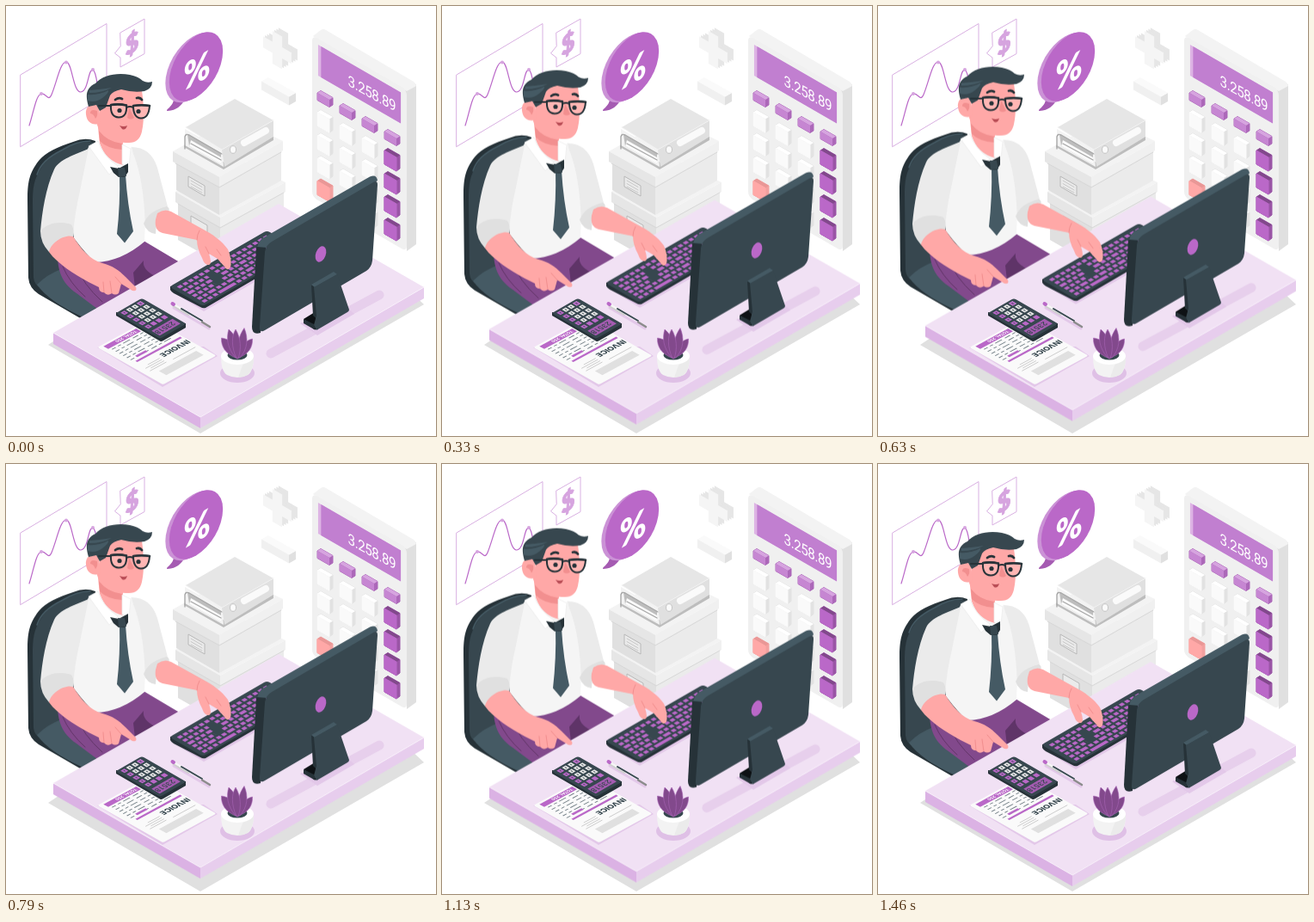
These frames come from a looping animation (500x500 px, 1.5 s). An HTML page:

```html
<!DOCTYPE html>
<html lang="en">
<head>
<meta charset="utf-8">
<title>Accountant at a desk</title>
<style>
html, body { margin: 0; width: 100%; height: 100%; overflow: hidden; background: #fff; }
svg { display: block; width: 100vw; height: 100vh; }
.float { animation: float 1.5s linear -20ms infinite; }
@keyframes float {
  0%, 100% { transform: translateY(.27px); }
  50% { transform: translateY(-9.73px); }
}
.ink { fill: #263238; } .dark { fill: #37474f; } .steel { fill: #455a64; }
.violet { fill: #ba68c8; } .orchid { fill: #c17fd0; } .plum { fill: #82498c; }
.skin { fill: #ffa8a7; } .blush { fill: #f28f8f; }
.g1 { fill: #fafafa; } .g2 { fill: #f3f3f3; } .g3 { fill: #ebebeb; } .g4 { fill: #e0e0e0; }
.line { fill: none; stroke-linecap: round; stroke-linejoin: round; }
.pale { stroke: #d9b0e2; } .vio { stroke: #ba68c8; } .gray { stroke: #c7c7c7; } .char { stroke: #263238; }
.white { fill: #fff; }
</style>
</head>
<body>
<svg viewBox="0 0 500 500" xmlns="http://www.w3.org/2000/svg">
<defs>
  <path id="plus" d="M-6.5-19h13v12.500h12.500v13H6.500V19h-13V6.500H-19v-13h12.500z"/>
  <g id="key">
    <path d="M0 3 4 .5 18 8.500V24L14 27 0 19z" fill="var(--side)" stroke="var(--side)" stroke-linejoin="round"/>
    <path d="M0 3 4 .5 18 8.500 14 11z" fill="var(--top)"/>
    <path d="M0 3 14 11V27L0 19z" fill="var(--face)" stroke="var(--face)" stroke-linejoin="round"/>
  </g>
  <g id="flat" stroke-linejoin="round">
    <path d="M0 3 4 .5 18 8.500V17L14 19.500 0 11.500z" fill="#ac68b9" stroke="#ac68b9"/>
    <path d="M0 3 4 .5 18 8.500 14 11z" fill="#d6a4df"/>
    <path d="M0 3 14 11V19.500L0 11.500z" fill="#c686d2"/>
  </g>
</defs>

<!-- chart and bubbles -->
<g class="line">
  <path class="pale" d="M17 80 117 20.500V104L17 163.500z"/>
  <path class="vio" stroke-width="1.200" d="M27 139C32 124 35 103 41 102S49 112 53 103C59 89 63 65 70 65S78 101 87 100 95 74 101 74Q104 76 106 90"/>
  <path class="pale" d="M133 31 161 15V55.500L133 71V60L126.500 55 133 47z"/>
</g>
<g fill="#d6a4df">
  <circle cx="41" cy="102" r="2"/><circle cx="70" cy="65.500" r="2"/><circle cx="101" cy="74" r="2"/>
  <text transform="matrix(.866 -.5 0 1 146.500 54.500)" text-anchor="middle" font-family="Lato, sans-serif" font-weight="900" font-size="31" stroke="#d6a4df">$</text>
</g>
<path d="M191 96Q200 108 190 118 185 122 188 122 203 121 209 106z" fill="#a55bb2"/>
<g fill="#cb92d6">
  <circle r="36" transform="matrix(.866 -.5 0 1 216.500 72)"/>
  <circle r="36" transform="matrix(.866 -.5 0 1 218.500 71.200)"/>
</g>
<circle r="36" class="violet" transform="matrix(.866 -.5 0 1 221 70.500)"/>
<text transform="matrix(.866 -.5 0 1 222 90)" text-anchor="middle" font-family="Lato, sans-serif" font-weight="900" font-size="43" class="white">%</text>

<!-- plus and minus -->
<g fill="#e6e6e6">
  <use href="#plus" transform="matrix(.866 .5 0 1 322.500 47.500)"/>
  <use href="#plus" transform="matrix(.866 .5 0 1 320 48.800)"/>
  <use href="#plus" transform="matrix(.866 .5 0 1 317.500 50.100)"/>
</g>
<use href="#plus" fill="#f5f5f5" transform="matrix(.866 .5 0 1 315.500 51.300)"/>
<path class="g4" d="M329 105.500 337 101V111L329 115.500z"/>
<path class="g1" d="M297 87.500 305 83 337 101 329 105.500z"/>
<path fill="#f0f0f0" d="M297 87.500 329 105.500V115.500L297 97.500z"/>

<!-- wall calculator -->
<path class="g4" d="M464 97 477 91V277L466 285z"/>
<path class="g2" d="M357 35 366 28Q369 26 372 28L474 88Q477 90 477 93L466 99z"/>
<g transform="matrix(.866 .5 0 1 356 34)">
  <rect width="127" height="188" rx="6" fill="#f0f0f0"/>
  <rect x="8" y="7" width="111" height="36" fill="#ddb4e4"/>
  <rect x="12" y="7" width="107" height="36" class="orchid"/>
  <text x="48" y="35" transform="skewY(-1)" font-family="Roboto, sans-serif" font-size="17.500" letter-spacing="-.5" class="white">3.258.89</text>
</g>
<use href="#flat" x="362" y="98"/><use href="#flat" x="388" y="113"/><use href="#flat" x="414" y="128"/><use href="#flat" x="440" y="143"/>
<g style="--face:#fafafa;--top:#fff;--side:#e2e2e2">
  <g id="col"><use href="#key" x="362" y="120.500"/><use href="#key" x="362" y="147.500"/><use href="#key" x="362" y="174"/></g>
  <use href="#col" x="26" y="15"/><use href="#col" x="52" y="30"/>
  <use href="#key" x="388" y="216"/><use href="#key" x="414" y="231"/>
</g>
<g style="--face:#ffa8a7;--top:#e99796;--side:#f2a09f"><use href="#key" x="362" y="200.500"/></g>
<g style="--face:#ba68c8;--top:#82498c;--side:#9a55a6">
  <use href="#key" x="440" y="165"/><use href="#key" x="440" y="192"/><use href="#key" x="440" y="219"/><use href="#key" x="440" y="246"/>
</g>

<!-- boxes and binder -->
<path class="g4" d="M200 225 249 253V300L200 272z"/>
<path class="g3" d="M249 253 323 212V262L249 300z"/>
<path class="g2" d="M197 216 268 178 325 205 249 246z"/>
<path fill="#e6e6e6" d="M197 216 249 246V257L197 228z"/>
<path fill="#f0f0f0" d="M249 246 325 205V216L249 257z"/>
<path class="line" stroke="#d8d8d8" d="M200 230 249 258 323 217"/>
<path class="g3" stroke="#b8b8b8" d="M215 244 234 255V266L215 256z"/>
<path class="g4" d="M198 180 248 208V243L198 214z"/>
<path class="g3" d="M248 208 320 168V203L248 243z"/>
<path class="g2" d="M194 169 265 130 322 157 248 199z"/>
<path fill="#e6e6e6" d="M194 169 248 199V210L194 181z"/>
<path fill="#f0f0f0" d="M248 199 322 157V168L248 210z"/>
<path class="line" stroke="#d8d8d8" d="M197 183 248 211 320 170"/>
<path class="g3" stroke="#b8b8b8" d="M212 198 231 209V221L212 210z"/>
<path class="line gray" d="M215 203 228 210.500M215 206.500 228 214M215 210 228 217"/>
<path fill="#bdbdbd" d="M207 164 253 190 311 156V151L254 182 209 157z"/>
<path class="g2" d="M208 143 251 167 253 187 208 162z"/>
<path fill="#bdbdbd" d="M211 149 250 171V184L213 163z"/>
<path class="g1" d="M215 156 250 176V184L213 163z"/>
<path class="line" stroke="#a8a8a8" stroke-width="1.400" d="M208 166V152Q209 148 213 150L251 172M215 160 250 179"/>
<path fill="#e6e6e6" d="M209 141 266 108 311 133 251 167z"/>
<path class="g4" d="M251 167 311 133V152L254 187z"/>
<path class="line" stroke="#fafafa" stroke-width="8" d="M277 159 302 145"/>
<path class="line" stroke="#f2f2f2" d="M209 141 251 167 311 133"/>
<ellipse cx="264" cy="167" rx="3.500" ry="4.300" fill="#fafafa" stroke="#c5c5c5"/>

<path class="g4" d="M49 394 226 497 486 347 470 332 226 465 70 380z"/>

<g class="float">
  <!-- chair -->
  <path class="ink" d="M104 157Q92 152 78 158C60 164 46 170 38 180 27 194 25 205 25 226L26 316Q27 328 38 335L88 364 115 345z"/>
  <path class="dark" d="M106 160Q90 155 74 163C58 170 46 178 41 188 32 202 31 212 31 230L32 316Q33 324 40 328L70 345 120 300z"/>
  <path class="line" stroke="#455a64" stroke-width="1.500" d="M98 157Q82 157 66 167C48 176 40 184 36 196"/>
  <path class="steel" d="M36 324Q48 312 64 306L120 340 90 362Q50 344 36 324z"/>

  <!-- trousers -->
  <path class="plum" d="M60 289C60 306 64 322 82 334L106 352 202 298 160 273 108 292z"/>
  <path fill="#5f3468" d="M148 310 160 296Q158 306 173 314L150 327z"/>
  <path class="line" stroke="#633669" d="M84 305Q88 322 112 344M66 303Q74 322 92 338"/>

  <!-- shirt -->
  <path class="skin" d="M106 132 109 160Q118 184 136 185L136 150z"/>
  <path class="blush" d="M108 145Q118 158 135 160L135 167Q118 166 109 157z"/>
  <path fill="#f5f5f5" d="M96 164C88 180 78 215 76 250L79 270Q94 290 104 298 134 297 161 274L162 250C168 226 160 184 146 163L136 185Q116 180 109 160z"/>
  <path class="g3" d="M96 166C80 173 62 178 56 190 46 212 42 240 40 262L78 266Q80 240 86 215 92 185 96 166z"/>
  <path class="g4" d="M40 262C48 252 62 250 76 254Q80 261 78 269C66 268 56 277 50 286Q40 275 40 262z"/>
  <path class="g3" d="M146 164C161 164 171 172 176 188L189 237 162 256Q160 200 148 172z"/>
  <path class="g4" d="M187 233Q192 236 188 240 175 240 174 265 164 264 160 253 166 238 187 233z"/>
  <path class="white" stroke="#ebebeb" stroke-width=".7" d="M96 163 107 157Q112 174 130 186L120 196z"/>
  <path class="white" stroke="#ebebeb" stroke-width=".7" d="M135 161 145 166 143 187 135 184z"/>
  <path class="steel" d="M132 196H139Q141 230 148 262L138 275.500 129 265Q133 230 132 196z"/>
  <path class="ink" d="M121 187 131 189 142 183V193L138 199 131 199 125 194z"/>
  <path class="dark" d="M130 188H138L140 198 131 199z"/>

  <!-- head -->
  <path class="skin" d="M112 104 124 90 156 88C161 110 161 134 158 146Q155 159 143 159C124 159 111 153 106 138z"/>
  <path class="skin" d="M108 117C99 111 92 117 93 126 94 136 102 140 110 136z"/>
  <path class="blush" d="M106 122Q98 119 98 125 102 125 104 131 107 128 106 122z"/>
  <path class="dark" d="M96 117C92 104 93 95 104 90 112 80 130 77 144 80Q154 82 159 87 164 90 170 88 170 96 161 99 148 101 134 97 124 99 121 104L116 118 109 122 105 115z"/>
  <path class="steel" d="M95 110Q104 113 112 107 120 101 119 98 108 104 95 103zM97 101Q112 101 123 95 110 97 97 98z"/>
  <path class="line char" stroke-width="2.800" d="M127 109Q131 106 135 108M152 107Q156 106 158 109"/>
  <path class="blush" d="M143 118Q142 125 141 130 145 133 149 130z"/>
  <g class="line char" stroke-width="2">
    <path fill="#ffb6b4" d="M122 115Q131 113.500 140 115.500 141 129.500 131 129.500 121 129 122 115z"/>
    <path fill="#ffb6b4" d="M148 116Q158 114.500 167 116 166 130.500 157 130.500 148 130 148 116z"/>
    <path d="M108 116 122 116M140 118Q144 116 148 118"/>
    <path stroke-width="2.600" d="M122 115Q131 113.500 140 115.500M148 116Q158 114.500 167 116"/>
  </g>
  <g class="ink"><circle cx="132" cy="121.500" r="2.600"/><circle cx="154" cy="122.500" r="2.600"/></g>
  <path fill="#b94c55" d="M132 139Q137 141 141 139 139 145 135 143z"/>

  <!-- desk -->
  <path fill="#dbb2e4" d="M55 380 226 477V491L55 393z"/>
  <path fill="#e7cded" d="M226 477 486 327V340L226 491z"/>
  <path fill="#f1e1f4" d="M55 380 317 230 486 327 226 478z"/>
  <path class="line" stroke="#f8effa" d="M55 380 226 478 486 327"/>
  <path class="line" stroke="#e7cfec" stroke-width="11" d="M308 404 434 336"/>
  <path fill="#e3c8e9" d="M342 369 362 383 405 358 396 350z"/>

  <!-- keyboard -->
  <path fill="#e3c8e9" d="M196 334 230 355 310 309 310 290z"/>
  <path class="ink" d="M191 326V330Q192 332 195 334L226 350Q229 352 232 351L345 285V279z"/>
  <g transform="matrix(.866 -.5 .866 .5 190 326.500)">
    <rect width="131" height="45" rx="4" class="dark"/>
    <g fill="none" class="vio" stroke-width="4">
      <path stroke-dasharray="4.800 2.400" d="M5 7H126"/>
      <path stroke-dasharray="4.800 2.400" d="M5 14H38M48 14H126"/>
      <path stroke-dasharray="7.600 2.400 4.800 2.400 4.800 2.400" d="M5 20.500H36M50 20.500H126"/>
      <path stroke-dasharray="4.800 2.400" d="M5 27H34M45 27H126"/>
      <path stroke-dasharray="4.800 2.400 4.800 2.400 8.600 2.400" d="M5 33.500H126"/>
      <path stroke-dasharray="4.800 2.400 4.800 2.400 4.800 2.400 22 2.400" d="M5 40H126"/>
    </g>
  </g>

  <!-- arms -->
  <path class="skin" d="M176 241Q184 235 192 239L228 259C240 265 252 274 258 283Q263 294 261 304 257 309 254 303L246 294 236 288Q240 300 236 301 231 302 228 293 222 282 222 272L182 264Q172 261 174 248z"/>
  <path class="line" stroke="#f28f8f" d="M236 288 232 280M250 290 245 283M225 261Q222 266 222 272"/>
  <path class="skin" d="M50 286C52 275 68 265 78 268 88 284 98 295 112 299 124 302 131 307 139 315L151 327Q153 332 147 331L134 323 131 334Q127 337 123 334 118 338 114 333 108 333 108 327L96 321C80 312 60 300 50 286z"/>
  <path class="line" stroke="#f28f8f" d="M134 323 127 315M123 334 121 320M114 333 113 321"/>

  <!-- monitor -->
  <path class="ink" d="M303 269 296 380Q286 383 286 373L291 282Q292 274 303 269z"/>
  <path class="steel" d="M292 280Q294 272 301 268.500L423 198.500Q431 195 432 203L304 281z"/>
  <path class="dark" d="M309 274 427 205Q432 202 432 208L426 296Q425 304 419 308L301 377Q294 381 295 372L301 286Q302 278 309 274z"/>
  <ellipse cx="366" cy="288.500" rx="5.800" ry="9.500" transform="rotate(20 366 288.500)" class="violet"/>
  <path fill="#0e1215" d="M346 364 359 356 363 376 358 376z"/>
  <path class="ink" d="M346 364 358 370 360 377 346 369zM355 324 359 327 363 365 357 360z"/>
  <path class="steel" d="M355 324 381 309 385 312 359 327z"/>
  <path class="dark" d="M358 327 385 312 399 353Q399 355 397 356L361 377 358 371 361 360z"/>
</g>

<!-- invoice -->
<path fill="#e3c8e9" d="M106 397 182 443 246 407 230 396z"/>
<g transform="matrix(-.866 .47 -.866 -.49 244.500 406.500)">
  <rect width="71.500" height="88" rx="2" class="g1"/>
  <rect x="8" y="9" width="50" height="10" class="g4"/>
  <text x="1" y="39" font-family="Inter, sans-serif" font-weight="800" font-size="8.800" class="dark">INVOICE</text>
  <rect x="2" y="44" width="60" height="2.600" class="violet"/>
  <g fill="none" class="gray" stroke-width=".8">
    <path d="M42 25H64M42 28H60M42 31H64M42 34H58M4 24H34"/>
  </g>
  <g fill="none" stroke="#77838a" stroke-width="1.100" stroke-dasharray="9 3 4 3 7 4">
    <path d="M10 51H64M10 56H64M10 61H64M10 66H64M10 71H64M10 76H64"/>
  </g>
  <rect x="42" y="50" width="14" height="3" class="violet"/>
  <rect x="22" y="79" width="44" height="6.500" class="violet"/>
  <text x="25" y="84.300" font-family="Inter, sans-serif" font-weight="700" font-size="5" class="white">TOTAL 250</text>
</g>

<!-- pocket calculator -->
<path class="ink" d="M128 356V360L178 389Q180 391 183 389L209 374V369z"/>
<g transform="matrix(-.866 .5 -.866 -.5 209.500 369.500)">
  <rect width="35" height="59.500" rx="3" class="dark"/>
  <rect x="3.500" y="4" width="28" height="11" fill="#a45bb1"/>
  <text x="7" y="12.500" font-family="Roboto, sans-serif" font-weight="500" font-size="8.500" class="dark">23518</text>
  <g fill="none" stroke="#e6e6e6" stroke-width="5" stroke-dasharray="5.400 2.600">
    <path d="M7 27.500V57M14.300 27.500V57M21.500 27.500V57"/>
    <path class="vio" d="M28.700 19.500V57M7 19.500V25M14.300 19.500V25M21.500 19.500V25M7 51.500V57"/>
  </g>
  <path fill="none" stroke="#37474f" stroke-width="1" stroke-dasharray="2.400 5.600" d="M7 29V57M14.300 29V57M21.500 29V57M28.700 21V57"/>
</g>

<!-- pen -->
<g class="line">
  <path stroke="#e3c8e9" stroke-width="3" d="M195 351 236 375"/>
  <path stroke="#cfcfcf" stroke-width="4" d="M195 348 212 358"/>
  <path stroke="#f7f7f7" stroke-width="2.500" d="M196 347.500 228 366"/>
  <path stroke="#37474f" stroke-width="2" d="M204 352 228 366"/>
  <path stroke="#8c8c8c" stroke-width="2.500" d="M228 367.500 237 373"/>
  <path class="vio" stroke-width="4" d="M193.500 346 195 347"/>
</g>

<!-- plant -->
<ellipse cx="269" cy="427" rx="20" ry="11" fill="#dfc0e6"/>
<path class="g2" d="M250 407C250 418 252 426 257 429Q269 435 281 429C286 426 288 418 288 407z"/>
<path class="g3" d="M276 415Q286 412 288 407 288 424 281 429 276 432 270 432z"/>
<ellipse cx="269" cy="407" rx="19" ry="10" class="white"/>
<ellipse cx="269" cy="406" rx="11.500" ry="5.500" fill="#37474f"/>
<g class="plum" stroke="#a866b5" stroke-width=".6">
  <path d="M267 409C255 404 250 396 250.500 386 260 387 268 394 270 406z"/>
  <path d="M270 409C282 405 287 397 286.500 387 278 389 271 396 268 406z"/>
  <path d="M267 409C257 397 256 386 259 376 268 384 272 394 271 408z"/>
  <path d="M268 409C268 394 271 383 277 374.500 282 386 281 399 272 409z"/>
  <path d="M268 410C262 396 262 384 267 376 273 386 274 398 270 410z"/>
</g>
</svg>
</body>
</html>
```
